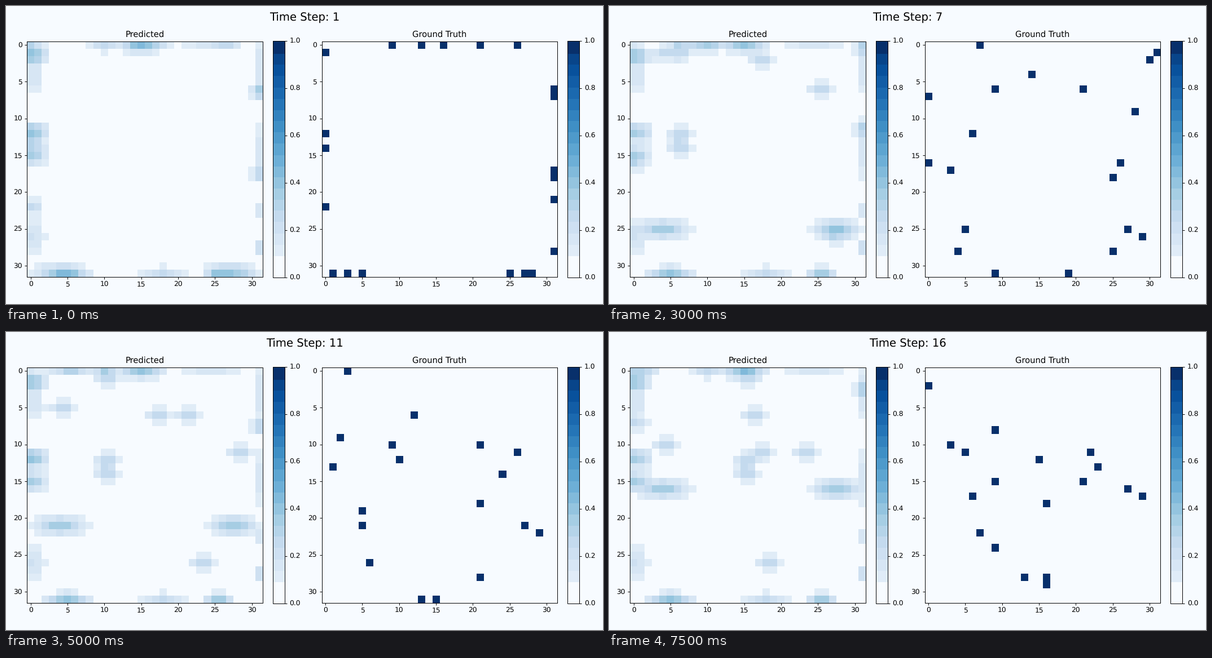
Write a matplotlib script that moves like this. It is 1058x529 px and loops after 8 s.

```python
import numpy as np
import matplotlib.pyplot as plt
from matplotlib.animation import FuncAnimation
from matplotlib.colors import ListedColormap

W, H, DPI = 1058, 529, 92
N, STEPS = 32, 16
PT = W / 12 / DPI  # one layout point at this dpi
PAPER = "#f7fbff"

plt.rcParams.update({
    "font.family": "DejaVu Sans",
    "font.size": 10 * PT,
    "text.hinting": "none",
    "axes.titlesize": 12 * PT,
    "axes.titlepad": 6 * PT,
    "axes.linewidth": 0.8 * PT,
    "figure.titlesize": 16 * PT,
})
for axis in "xy":
    plt.rcParams.update({
        f"{axis}tick.major.size": 3.5 * PT,
        f"{axis}tick.major.width": 0.8 * PT,
        f"{axis}tick.major.pad": 3.5 * PT,
    })

# Blue map in even bands above a blank floor
FLOOR, BANDS = 0.09, 19
edges = np.linspace(FLOOR, 0.945, BANDS)
shades = np.concatenate([[0], (edges[:-1] + edges[1:]) / 2, [1]])
band = np.digitize((np.arange(256) + 0.5) / 256, edges)
CMAP = ListedColormap(plt.get_cmap("Blues")(shades[band]))

# Corner points of each particle's way, walked one cell per step
PATHS = [
    [(9, 0), (9, 31)],
    [(21, 0), (21, 31)],
    [(0, 12), (31, 12)],
    [(31, 18), (0, 18)],
    [(31, 28), (0, 28)],
    [(27, 31), (27, 0)],
    [(31, 7), (31, -9)],
    [(31, 21), (47, 21)],
    [(31, 6), (6, 31)],
    [(1.5, 31.5), (31.5, 1.5)],
    [(13, 0), (0, 0), (0, 9)],
    [(28, 31), (29, 31), (29, 0)],
    [(16, 0), (16, 2), (0, 18)],
    [(0.5, 1), (0.5, 7), (9.5, 16)],
    [(0, 22), (0, 14), (9, 5)],
    [(31.5, 17), (27.5, 17), (17.5, 7)],
    [(26, 0), (28, 0), (36, 8)],
    [(5.2, 31.5), (5.2, 20.5), (9.2, 24.5)],
    [(0.5, 14.5), (6.5, 20.5), (6.5, 9.5)],
    [(3.5, 31.4), (14.5, 31.4), (14.5, 30.4), (9.5, 25.4)],
    [(25.5, 31.9), (14.5, 31.9), (19.5, 26.9)],
]

# Steady glow along each wall: centre, spread, peak
TOP = [(10, 2, 0.28), (15, 3, 0.4), (24.5, 4.5, 0.17)]
BOTTOM = [(5, 3, 0.38), (18, 3, 0.25), (25.5, 2, 0.38)]
LEFT = [(1.5, 1.5, 0.38), (4.5, 2.6, 0.18), (11.8, 1.4, 0.38),
        (15, 1.4, 0.36), (26, 3, 0.2)]
RIGHT = [(3, 5, 0.17), (14.5, 5, 0.15), (22.5, 0.9, 0.22), (27.5, 0.8, 0.34)]

ROWS, COLS = np.mgrid[:N, :N]


def glow(x, y, rx, ry, peak):
    """Soft bump, cubed so that overlaps add up gently."""
    return (peak * np.exp(-((COLS - x) / rx) ** 2 - ((ROWS - y) / ry) ** 2)) ** 3


def spot(x, y):
    return glow(x + 0.4, y, 1.9, 1.25, 0.26)


WALLS = (sum(glow(c, 0, s, 1, p) for c, s, p in TOP)
         + sum(glow(c, 31, s, 1, p) for c, s, p in BOTTOM)
         + sum(glow(0, c, 2.4, s, p) for c, s, p in LEFT)
         + sum(glow(31, c, 0.9, s, p) for c, s, p in RIGHT))


def predicted(t):
    field = WALLS.copy()
    for y in (0, 13):  # pairs drifting right
        field += spot(t, y - 1) + spot(t, y + 1)
        field += glow(t + 0.3, y, 1.1, 0.6, 0.28)
    for y in (6.5, 17.5):  # climbing the right wall
        field += glow(31, y - t, 1.1, 1, 0.34)
    for x, y in [(4, t - 5), (17, t - 4), (31 - t, 6), (38 - t, 11),
                 (33 - t, 26)]:
        field += spot(x, y)
    field += glow(4, 31 - t, 3.6, 1.25, 0.36)
    field += glow(27.5, 31 - t, 3.2, 1.25, 0.38)
    field += glow(0, 22 - t, 2, 1.2, 0.24)
    field += glow(15.5 - t, 0, 3, 0.9, 0.3)
    field += glow(26.5 + t, 0, 1.8, 0.9, 0.27)
    return np.cbrt(field)


def walk(path, t):
    points = np.array(path, float)
    steps = np.abs(np.diff(points, axis=0)).sum(axis=1)
    when = np.concatenate([[0], np.cumsum(steps)])
    return [int(np.floor(np.interp(t, when, p) + 1e-6)) for p in points.T]


def truth(t):
    grid = np.zeros((N, N))
    for path in PATHS:
        col, row = walk(path, t)
        if 0 <= col < N and 0 <= row < N:
            grid[row, col] = 1
    return grid


fig = plt.figure(figsize=(W / DPI, H / DPI), dpi=DPI, facecolor=PAPER)


def add_axes(x, y, w, h):
    return fig.add_axes([x / W, 1 - (y + h) / H, w / W, h / H])


def add_panel(x, title, data):
    ax = add_axes(x, 62.55, 417.7, 418)
    image = ax.imshow(data, cmap=CMAP, vmin=0, vmax=1, aspect="auto",
                      interpolation="nearest")
    ax.set_title(title)
    ax.set_xticks(range(0, N, 5))
    ax.set_yticks(range(0, N, 5))
    bar = add_axes(x + 435.7, 61.6, 21, 420)
    fig.colorbar(image, cax=bar, ticks=np.linspace(0, 1, 6))
    return image


left = add_panel(37.4, "Predicted", predicted(0))
right = add_panel(559.7, "Ground Truth", truth(0))
heading = fig.suptitle("Time Step: 1")


def update(t):
    left.set_data(predicted(t))
    right.set_data(truth(t))
    heading.set_text(f"Time Step: {t + 1}")
    return left, right, heading


anim = FuncAnimation(fig, update, frames=STEPS, interval=500,
                     init_func=lambda: update(0), repeat=True, repeat_delay=0)
plt.show()
```
